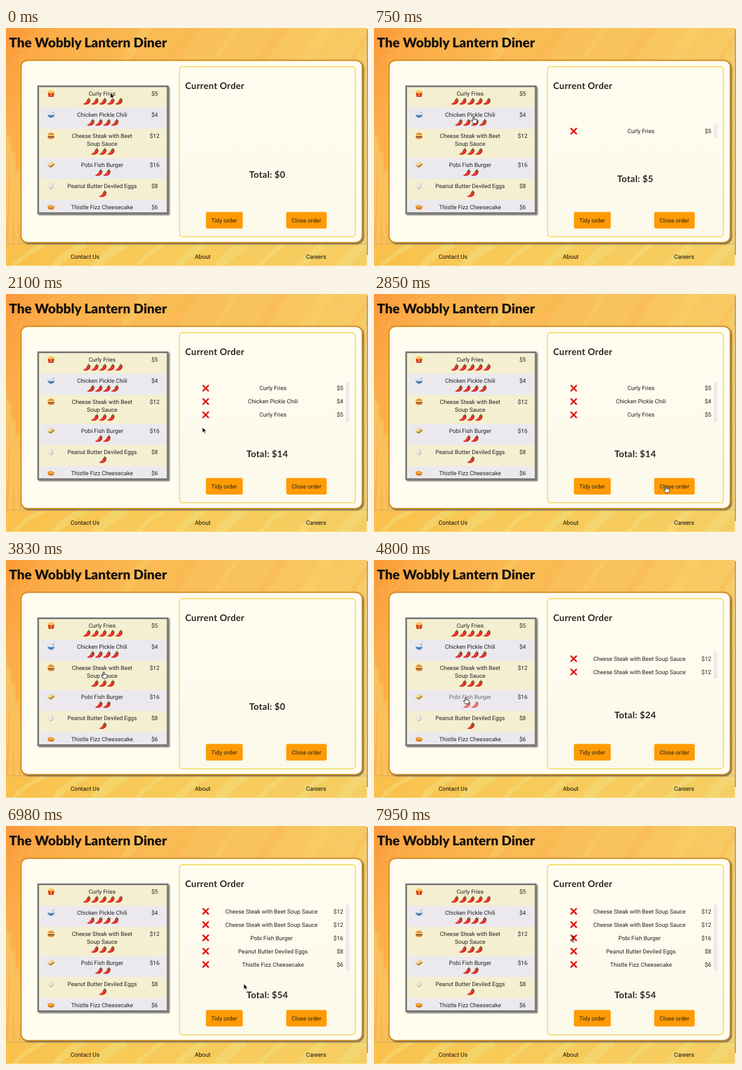
Write an HTML page that moves like this. It is 600 px wide and 394 px high and loops after 8000 ms.

```html
<!DOCTYPE html>
<html lang="en">
<head>
<meta charset="utf-8">
<title>Diner order</title>
<style>
html, body { margin: 0; width: 100%; height: 100%; overflow: hidden; background: #f8c95e; }
svg { display: block; width: 600px; height: 394px; font: 9.6px Roboto, sans-serif; fill: #222; text-rendering: geometricPrecision; }
.mid { text-anchor: middle; }
.head { font: 700 15px Lato, sans-serif; letter-spacing: .3px; fill: #2b2420; }
.title { font-size: 22px; font-weight: 900; letter-spacing: 0; fill: #17110c; }
.swirl { fill: none; }
.foot { font-size: 9.8px; fill: #111; }
</style>
</head>
<body>
<svg viewBox="0 0 600 394">
  <defs>
    <linearGradient id="sky" x2="1" y2=".35">
      <stop stop-color="#fc9838"/><stop offset=".14" stop-color="#fbae49"/><stop offset=".45" stop-color="#f9be57"/><stop offset="1" stop-color="#f7cd66"/>
    </linearGradient>
    <linearGradient id="floor">
      <stop stop-color="#f9c04b"/><stop offset=".3" stop-color="#f8c957"/><stop offset="1" stop-color="#f6ce63"/>
    </linearGradient>
    <linearGradient id="paper" x2="0" y2="1"><stop stop-color="#fffdf0"/><stop offset="1" stop-color="#faf9ea"/></linearGradient>
    <filter id="shade" x="-5%" y="-5%" width="112%" height="112%">
      <feDropShadow dx="2" dy="2" stdDeviation="1.2" flood-color="#555" flood-opacity=".8"/>
    </filter>
    <clipPath id="view"><rect x="55" y="98" width="211" height="207"/></clipPath>
    <g id="chili">
      <path d="M1-3.5C0 0-2.5 3-6.5 4.2C-3 6.6 5.6 5.4 6-1.2C6-4.4 2-5.4 1-3.5" fill="#d4271b"/>
      <path d="M2.6-1.6C2 1.2 0 3-2.4 4" fill="none" stroke="#f27a66" stroke-width=".9"/>
      <path d="M1.6-3.2Q4-5 6-2.2M4-4L3-6" fill="none" stroke="#5c7a34" stroke-width="1.3"/>
    </g>
    <path id="cross" d="M-4.3-4.3L4.3 4.3M4.3-4.3L-4.3 4.3" stroke="#df1414" stroke-width="2.6" stroke-linecap="round"/>
    <g id="fries">
      <path d="M-4-4L-3 1M-2-5V1M0-5.5V1M2-5V1M4-4L3 1" stroke="#f6bd35" stroke-width="1.6"/>
      <path d="M-5.5-2Q0 2 5.5-2L4 5.5H-4Z" fill="#d8321e"/><circle cy="2.5" r="1.5" fill="#f4b52d"/>
    </g>
    <g id="bowl">
      <path d="M1-1L5-5" stroke="#8e9aa2" stroke-width="1.2"/>
      <path d="M-6-1H6Q5 5 0 5T-6-1" fill="#477fb8"/><ellipse cy="-1" rx="6" ry="1.8" fill="#d9e6ee"/>
    </g>
    <g id="burger">
      <path d="M-5.5-1Q-5-5.5 0-5.5T5.5-1Z" fill="#e09a3e"/><path d="M-5.5 2.2H5.5Q5 5.5 0 5.5T-5.5 2.2" fill="#dc9238"/>
      <path d="M-5.8-.3H5.8" stroke="#f3c53c" stroke-width="1.3"/><path d="M-5.5 1.5H5.5" stroke="#6f3219" stroke-width="1.6"/>
    </g>
    <g id="bread">
      <path d="M-6 0L1-5L6-1L0 5Z" fill="#d48726"/><path d="M-6 0L1-4.5L4-2L-2 2Z" fill="#fae0a0"/>
      <path d="M-5.5 1.6L-1 3.6L5.5-.2" fill="none" stroke="#75963b"/>
    </g>
    <g id="egg"><ellipse cy=".5" rx="3.8" ry="5" fill="#c9c4be"/><ellipse cx="-.7" cy="-.4" rx="2.6" ry="3.6" fill="#efece8"/></g>
    <g id="pie"><path d="M-6-1Q-4-4 0-3.5T6-1L4 3.5Q0 5-4 3.5Z" fill="#db7a1d"/><ellipse cy="-1" rx="4.6" ry="1.8" fill="#f4b04c"/></g>
    <path id="arrow" d="M0 0V9.6L2.2 7.5L3.8 11L5.4 10.3L3.9 7H7Z" fill="#111" stroke="#fff" stroke-width=".8"/>
    <path id="hand" d="M-1 1Q0-.6 1 1V4.4Q2.5 3.2 3 4.8Q4.5 4 4.8 5.5Q6 5.2 6 6.5Q6 9 4.5 11H-.8Q-1.6 9.4-2.6 8.2Q-4.5 6-3.4 5.6Q-2.2 5.2-1 6.8Z" fill="#fff" stroke="#111" stroke-width=".9"/>
    <path id="beam" d="M-2-5Q0-5 0-3.5Q0-5 2-5M0-3.5V3.5M-2 5Q0 5 0 3.5Q0 5 2 5M-1.2 1H1.2" fill="none" stroke="#111" stroke-width=".9"/>
  </defs>

  <rect width="600" height="394" fill="url(#sky)"/>
  <g class="swirl" id="swirls"></g>
  <rect y="357" width="600" height="37" fill="url(#floor)"/>
  <g class="swirl" id="waves"></g>
  <path d="M0 357.5H598" stroke="#b9a27a" stroke-opacity=".6"/>
  <path d="M0 393.5H598" stroke="#fff0b0" stroke-opacity=".55"/>
  <rect x="598" width="2" height="394" fill="#f4eddb"/>
  <rect x="598" y="2" width="2" height="374" fill="#aaa39a"/>

  <text class="head title" x="5" y="32">The Wobbly Lantern Diner</text>
  <rect x="25" y="53.5" width="565.4" height="301.7" rx="11" fill="#fffcf0" stroke="#d08a16" stroke-width="1.8" filter="url(#shade)"/>
  <rect x="53.3" y="96.5" width="214.6" height="210" fill="#f5efd1" stroke="#777" stroke-width="2.8" filter="url(#shade)"/>
  <g id="menu" clip-path="url(#view)"></g>

  <rect x="287.5" y="64" width="291.6" height="281.6" rx="5" fill="url(#paper)" stroke="#f2d24c" stroke-width="1.4"/>
  <text class="head" x="297" y="101">Current Order</text>
  <g id="order"></g>
  <rect x="331.4" y="304.6" width="61" height="27.4" rx="3" fill="#ff9b05"/>
  <rect x="464.4" y="304.6" width="67.2" height="27.4" rx="3" fill="#ff9b05"/>
  <g class="mid">
    <text x="361.7" y="322">Tidy order</text><text x="498" y="322">Close order</text>
    <g class="foot"><text x="131" y="382">Contact Us</text><text x="326" y="382">About</text><text x="514" y="382">Careers</text></g>
  </g>
  <use id="cursor"/>
</svg>
<script>
const $ = id => document.getElementById(id);
const LOOP = 8000;
// icon, name lines, price, chilies, row top, row height
const dishes = [
  ['fries', ['Curly Fries'], 5, 5, 97, 35],
  ['bowl', ['Chicken Pickle Chili'], 4, 4, 132, 35],
  ['burger', ['Cheese Steak with Beet', 'Soup Sauce'], 12, 3, 167, 48],
  ['bread', ['Pobi Fish Burger'], 16, 2, 215, 35],
  ['egg', ['Peanut Butter Deviled Eggs'], 8, 1, 250, 35],
  ['pie', ['Thistle Fizz Cheesecake'], 6, 0, 285, 35]
];
// time, dish index (-1 closes the order)
const clicks = [[230, 0], [900, 1], [1430, 0], [2990, -1], [4050, 2], [4400, 2], [4880, 3], [5440, 4], [5980, 5]];
// time, x, y of the pointer tip
const path = [
  [0, 173, 107], [450, 173, 108], [700, 165, 147], [950, 165, 147], [1200, 166, 122], [1500, 166, 122],
  [2700, 484, 318], [3100, 484, 318], [3800, 162, 185], [4450, 162, 185], [4750, 152, 227], [4950, 152, 227],
  [5250, 150, 264], [5470, 150, 264], [5560, 150, 282], [5750, 150, 294], [6050, 150, 294],
  [6900, 394, 261], [7100, 394, 261], [7800, 330, 187], [LOOP, 330, 187]
];

const use = (id, x, y) => `<use href="#${id}" x="${x}" y="${y}"/>`;
const text = (s, x, y, cls = 'mid') => `<text class="${cls}" x="${x}" y="${y}">${s}</text>`;
const clamp = v => Math.max(0, Math.min(1, v));
const stroke = (d, color, width, opacity, extra = '') =>
  `<path d="${d}" stroke="${color}" stroke-width="${width}" stroke-opacity="${opacity}" ${extra}/>`;

$('menu').innerHTML = dishes.map(([icon, lines, price, hot, top, h], i) => {
  const chilies = Array.from({ length: hot }, (_, k) =>
    use('chili', 160.5 + (k - (hot - 1) / 2) * 13.3, top + 11.5 + 13 * lines.length)).join('');
  return `<rect x="55" y="${top}" width="212" height="${h}" fill="${i % 2 ? '#ece9ee' : '#f5efd1'}"/>` +
    use(icon, 74.7, top + 11.5) + text('$' + price, 246.3, top + 14.6) +
    `<g id="dish${i}">${lines.map((s, k) => text(s, 159.3, top + 14.6 + 13 * k)).join('')}${chilies}</g>`;
}).join('');

let art = '';
for (let i = 0; i < 7; i++) {
  const x = 130 + i * 75;
  art += stroke(`M${x + 32}-5Q${x + 12} 22 ${x - 12} 60`, i % 2 ? '#f8d873' : '#f9ad48', 8 + i % 3 * 6, .28);
}
for (let i = 0; i < 4; i++) {
  art += stroke(`M${-5 + i * 13} ${70 - i * 7}Q${20 + i * 14} ${45 - i * 9} ${60 + i * 18}-5`, '#ffcc74', 1.4, .3, 'stroke-dasharray="14 7"');
  art += stroke(`M${-4 + i * 8} ${150 + i * 28}Q${9 + i * 3} ${240 + i * 15} ${-8 + i * 14} 394`, '#f8d470', 6, .4);
  art += stroke(`M600 ${80 + i * 70}Q590 ${115 + i * 70} 592 ${160 + i * 70}`, '#f1e084', 6, .4);
}
$('swirls').innerHTML = art;
$('waves').innerHTML = Array.from({ length: 9 }, (_, i) =>
  stroke(`M${12 + i * 68} 396Q${28 + i * 68} 374 ${66 + i * 66} 357`, '#efdf80', 7 + i % 3 * 5, .45)).join('');

function drawOrder(items) {
  const n = items.length, first = 178.2 - 7.4 * n;
  const total = items.reduce((sum, i) => sum + dishes[i][2], 0);
  const rows = items.map((i, k) => {
    const y = first + 22 * k;
    return use('cross', 331, y) + text(dishes[i][1].join(' '), 440 + 2.5 * (dishes[i][2] < 10), y + 3.4) +
      `<text x="559" y="${y + 3.4}" text-anchor="end">$${dishes[i][2]}</text>`;
  });
  const bar = n ? `<rect x="563" y="${first - 11}" width="6" height="${22 * n}" rx="2" fill="#ebe9ed"/>` : '';
  $('order').innerHTML = bar + rows.join('') + text('Total: $' + total, 433, 247.5 + 7.45 * n, 'head mid');
}

function pointer(t) {
  const k = path.findIndex(p => p[0] > t), [t0, x0, y0] = path[k - 1], [t1, x1, y1] = path[k];
  const u = (t - t0) / (t1 - t0), e = u * u * (3 - 2 * u);
  return [x0 + (x1 - x0) * e, y0 + (y1 - y0) * e];
}

function cursorKind(t, x, y) {
  const onMenu = x > 55 && x < 267 && y > 97 && y < 305;
  const onButton = y > 304 && y < 333 && (x > 331 && x < 393 || x > 464 && x < 532);
  if (t > 100 && (onMenu || onButton)) return 'hand';
  return x > 324 && x < 338 && Math.abs(y - 185) < 8 ? 'beam' : 'arrow';
}

let shown;
function frame(now) {
  const t = now % LOOP, done = clicks.filter(c => c[0] <= t).map(c => c[1]);
  const items = done.slice(done.lastIndexOf(-1) + 1), key = items.join() + '|';
  if (key !== shown) drawOrder(items);
  shown = key;
  dishes.forEach((_, i) => {
    const dim = Math.max(...clicks.filter(c => c[1] === i)
      .map(([at]) => Math.min(clamp((t - at + 150) / 70), clamp((at + 260 - t) / 150))));
    $('dish' + i).setAttribute('opacity', 1 - .38 * dim);
  });
  const [x, y] = pointer(t);
  $('cursor').setAttribute('href', '#' + cursorKind(t, x, y));
  $('cursor').setAttribute('transform', `translate(${x} ${y})`);
  requestAnimationFrame(frame);
}
requestAnimationFrame(frame);
</script>
</body>
</html>
```
